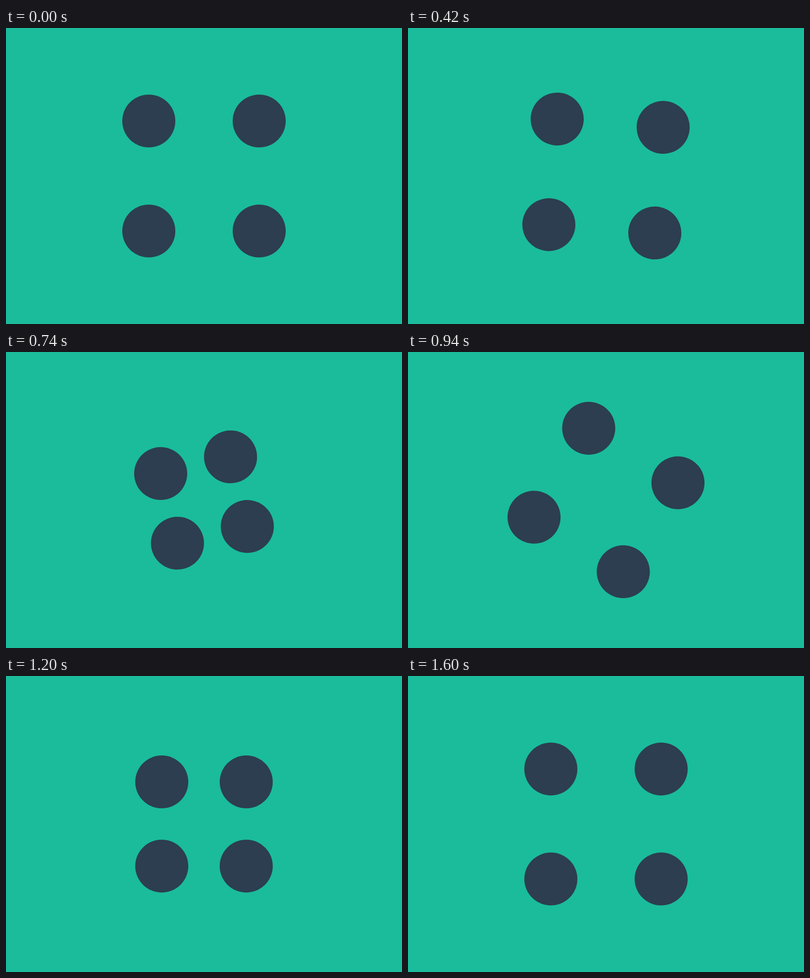
An HTML page for the animation above (1620 ms loop, 800 by 600 pixels).

```html
<!DOCTYPE html>
<html lang="en">
<head>
<meta charset="utf-8">
<title>Four dots</title>
<style>
  html, body { margin: 0; width: 100%; height: 100%; overflow: hidden; background: #1abc9c; }
  svg { display: block; width: 100vw; height: 100vh; }
  circle { fill: #2c3e50; }
</style>
</head>
<body>
<svg viewBox="0 0 800 600">
  <g id="ring">
    <circle r="53.6"/>
    <circle r="53.6"/>
    <circle r="53.6"/>
    <circle r="53.6"/>
  </g>
</svg>
<script>
  const LOOP = 1620, TICK = 20;
  const TURN = 1600, PULSE = 540;
  const FAR = 157.7, DEPTH = 69.6;
  const LOW = 0.298, POWER = 2.15;

  const ring = document.getElementById('ring');
  const dots = [...ring.children];

  // Quick accelerating pull inward, then a longer decelerating drift out.
  function reach(q) {
    const x = q < LOW ? q / LOW : (1 - q) / (1 - LOW);
    return FAR - DEPTH * x ** POWER;
  }

  function draw(now) {
    const t = Math.floor(((now + 0.5) % LOOP) / TICK) * TICK;
    const angle = 360 * t / TURN;
    const d = reach((t % PULSE) / PULSE) * Math.SQRT1_2;
    ring.setAttribute('transform', `translate(400 300) rotate(${angle})`);
    dots.forEach((dot, i) => {
      dot.setAttribute('cx', i % 2 ? d : -d);
      dot.setAttribute('cy', i < 2 ? -d : d);
    });
  }

  function loop(now) {
    draw(now);
    requestAnimationFrame(loop);
  }

  draw(0);
  requestAnimationFrame(loop);
</script>
</body>
</html>
```
